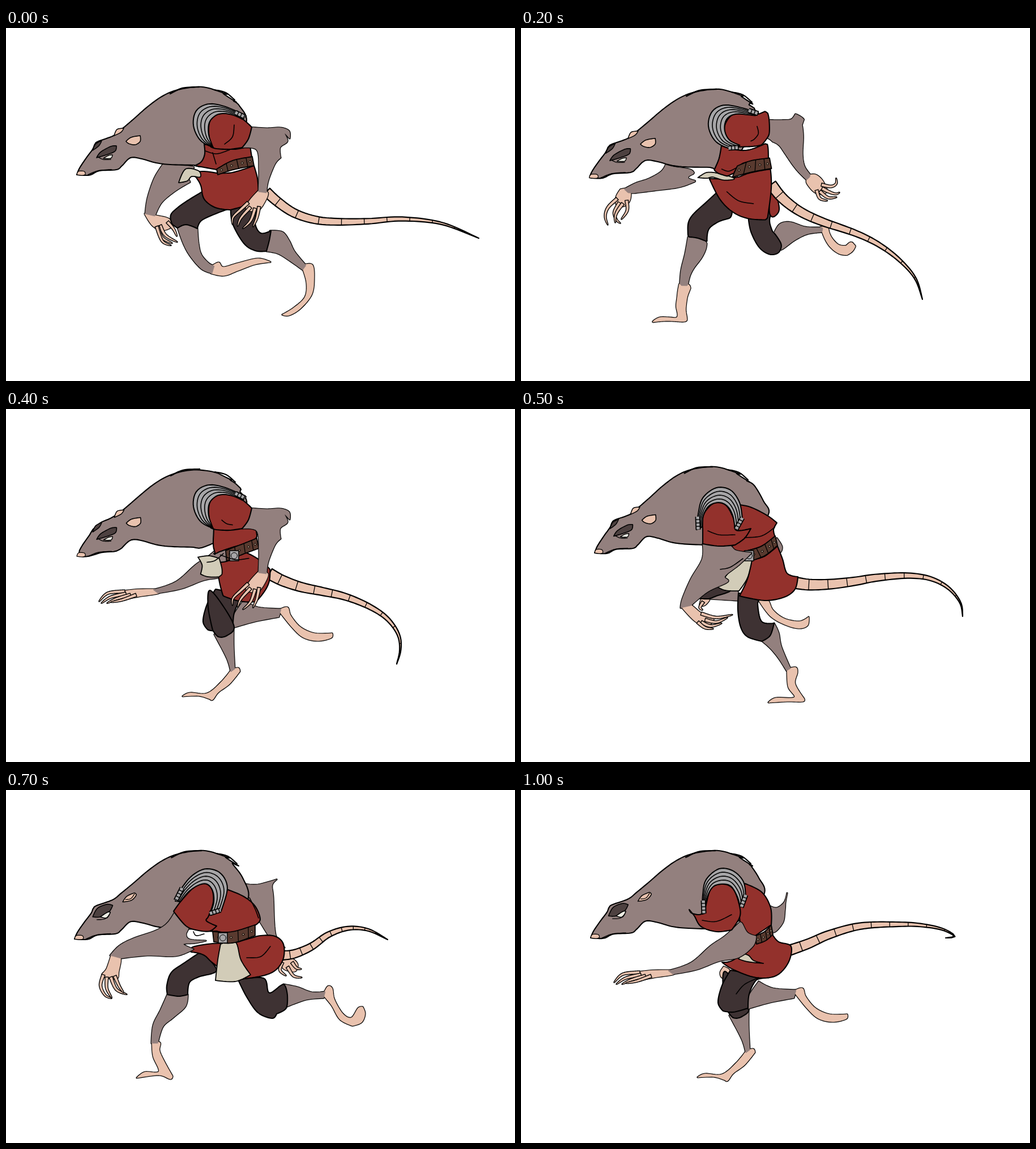
These frames come from a looping animation (899x623 px, 1100 ms). An HTML page with a canvas:

```html
<!DOCTYPE html>
<html lang="en">
<head>
<meta charset="utf-8">
<title>Running rat</title>
<style>
html, body { margin: 0; width: 100%; height: 100%; overflow: hidden; background: #fff; }
canvas { display: block; }
</style>
</head>
<body>
<canvas id="stage" width="899" height="623"></canvas>
<script>
const ctx = document.getElementById('stage').getContext('2d');
const FUR = '#93807e', SKIN = '#e9c2ae', RED = '#93312c', DARK = '#3e3233';
const CREAM = '#d2ccb8', STEEL = '#a6a5a7', LEATHER = '#593a2f', INK = '#000';

// Points are "x,y"; "!" marks a sharp corner, "|" splits a part into pieces.
// head: shift of the nose, shift of the hump, width of the tail.
const poses = {
  reach: {
    head: [0, 0, 0, 0, 17],
    back: '412,137 425,165 405,215 350,243',
    tail: '460,289 480,307 510,327 548,339 588,342 640,341 700,337 770,345 835,371',
    farArm: '277,241! 262,265 250,300 246,328! 263,332! 275,308 300,287 325,272! 320,255 330,245',
    farHand: '245,328! 265,331 288,337 293,350 275,357 258,348|285,342 296,355 302,368|272,348 282,366 303,378|268,350 276,370 294,380|266,350 276,376 292,384',
    nearArm: '428,175! 460,177 485,176 500,182 501,195! 492,186 497,200 484,211 485,229! 475,240 463,270 460,291! 446,289! 447,250 443,215 417,211!',
    nearHand: '445,288! 462,290 458,305 445,322 425,320 430,305|428,308 415,320 401,334 400,347|432,316 415,335 409,350|440,318 432,340 418,354|447,315 443,335 436,351',
    nearThigh: '348,288! 320,305 302,318 291,330 293,345 303,353! 318,347 338,354! 345,340 370,328 397,318! 370,305',
    nearShin: '303,352! 318,347 338,354! 340,380 345,400 358,415 368,420! 364,433! 345,425 325,402 313,380',
    nearFoot: '365,419! 376,414 384,422 410,415 445,407 467,413! 440,417 410,428 385,437 362,433!',
    farThigh: '397,318! 400,345 420,380 440,393 460,394! 465,375 468,358! 450,362 440,345 440,312',
    farShin: '466,358! 488,360 500,375 510,395 530,419! 524,427! 500,410 480,398 460,394!',
    farFoot: '526,418! 541,418 544,440 540,470 520,495 500,507 488,506! 508,494 528,475 531,450 524,425!',
    skirt: '328,255! 350,253 372,256! 400,255 438,243! 444,265 446,290! 430,310 396,321! 370,317 350,302 344,278 336,264',
    cream: '305,273! 317,249 340,252 343,263 328,262 320,270',
    top: '350,205! 400,214 431,208! 436,240! 400,246 372,250! 350,246 333,243! 345,236 351,222',
    belt: '372,249 400,234 435,227|374,259 402,250 438,243',
    sleeve: '362,210! 358,185 360,165 371,153 395,151 418,161 434,175! 428,196 417,211! 395,214 372,213',
    plate: '366,211 343,198 331,172 336,146 358,134 388,139 424,155|365,209 358,188 359,167 371,154 386,151 402,154 418,161',
    strap: '405,149 422,157',
    fold: '403,171 400,192 386,205|352,217 372,222 395,215|365,220 371,240'
  },
  strike: {
    head: [-4, 4, 3, 2, 19],
    back: '405,137 415,152 390,215 350,248',
    tail: '440,278 458,303 488,326 530,344 572,351 648,358 718,378 775,399 818,424',
    farArm: '258,236! 230,262 205,274 189,291! 213,293! 250,285 290,275 317,258! 296,255 312,248 275,243',
    farHand: '191,290! 207,291 212,308 205,318 188,315|188,310 177,328 175,345 186,358|193,316 188,338 205,350 223,347|200,314 194,332 196,340|206,308 212,322 208,338',
    nearArm: '434,161! 462,160 504,155! 492,168 494,180 492,230 491,264! 484,266! 470,238 455,205 440,202!',
    nearHand: '484,264! 498,263 508,285 515,300 500,305 490,295|508,290 525,303 545,299|505,298 520,314 538,324|500,302 510,320 528,327|494,298 491,316 505,323',
    flap: '438,258! 448,290 454,312 441,322',
    nearThigh: '345,284! 310,305 285,325 278,345 277,356! 290,359 307,369! 314,345 340,333 370,318',
    nearShin: '277,356! 290,359 307,369! 303,385 290,400 275,415 266,430 264,448! 252,446! 255,415 268,385',
    nearFoot: '250,444! 258,446 270,448 268,470 275,490 289,513! 285,517 260,517 224,520! 235,512 255,510 268,508 258,485 251,462',
    farThigh: '412,330! 420,355 440,385 460,394 475,388! 480,370 467,348! 450,330 440,300',
    farShin: '467,350! 478,340 495,338 520,347 549,353! 545,361! 520,360 500,370 480,385 473,382',
    farFoot: '543,353! 556,355 562,368 580,388 596,385! 597,370 602,369! 603,390 595,405! 580,404 565,392 552,375',
    skirt: '330,255! 365,258 385,262! 410,254 440,248! 440,275 430,334! 400,332 370,322 350,300',
    cream: '307,273! 318,254 331,249 350,251 385,261 365,265 340,258 327,267',
    top: '350,207! 366,214 400,218 434,202! 437,228! 410,233 390,237! 378,258! 350,250 331,249! 345,230',
    belt: '388,237 415,230 441,227|377,258 410,253 445,245',
    sleeve: '375,212! 362,195 358,172 372,152 395,152 415,158 434,161! 434,192 431,200! 415,213 400,216 385,214',
    plate: '372,214 343,200 330,172 337,146 358,134 388,140 422,152|381,208 364,195 358,178 362,160 376,151 396,152 415,157',
    strap: '402,146 421,153|365,211 380,212',
    fold: '402,170 409,190 399,207 390,212|365,290 385,303 411,302|351,240 365,250 384,248'
  },
  carry: {
    head: [-5, 7, 5, 6, 19],
    back: '400,134 413,150 390,215 352,250',
    tail: '444,274 465,297 494,320 530,340 570,367 605,405 627,445 630,490 600,534',
    farArm: '253,247! 245,262 200,274 174,278! 176,290! 230,288 275,287 306,282! 290,272 300,262 293,252',
    farHand: '160,280! 175,277 177,290 168,305 150,312 148,292|152,292 130,305 122,322 121,338|155,300 138,318 129,343|160,305 142,325 137,348|167,300 163,322 146,338',
    nearArm: '440,164! 465,165 485,163 485,146! 494,160 496,180 498,165! 503,190 502,225 510,248 531,258! 525,270! 500,255 470,225 450,200 434,199!',
    nearHand: '529,256! 550,255 562,262 565,278 550,280 523,268|553,263 575,259 583,245 568,230|558,268 585,268 588,256|555,274 575,278 588,270|550,274 565,285 578,287',
    flap: '442,285! 457,308 456,336 438,338',
    nearThigh: '345,298! 330,320 312,343 308,360 313,382! 335,382 350,385! 350,365 365,348 385,338',
    nearShin: '313,382! 335,382 350,385! 348,410 335,435 324,462! 309,464! 311,430',
    nearFoot: '309,460! 322,458 328,466! 315,485 303,500 298,515 290,519 260,516 239,518! 255,510 285,513 290,495 300,480',
    farThigh: '391,340! 392,365 402,390 420,407 435,408! 440,395 427,375! 430,355 434,343',
    farShin: '428,372! 435,352 455,347 485,355 519,350! 520,360! 490,368 465,380 445,395 433,402',
    farFoot: '515,350! 526,347 530,365 545,380 565,388 578,390! 565,396 545,393 527,380',
    skirt: '335,276! 352,276 375,271! 400,257 441,250! 445,290 440,343! 410,342 385,332 355,310',
    cream: '318,255! 340,260 372,270 350,272 333,266',
    top: '358,208! 395,214 434,203! 438,215 437,232! 400,238 376,250! 368,270! 352,262 354,235',
    belt: '376,250 400,238 437,232|369,269 402,256 440,251',
    sleeve: '388,208! 368,195 361,175 375,154 400,152 420,150 434,134! 442,150 443,180 434,200! 410,203',
    plate: '376,216 346,202 332,176 337,150 358,138 385,140 417,148|392,206 372,200 361,182 364,162 380,153 398,153 413,152',
    strap: '402,145 417,149|368,213 389,210',
    fold: '432,177 429,183 422,187|362,288 385,308 410,318|358,258 368,256 376,246'
  },
  pass: {
    head: [5, -5, -3, -2, 20],
    back: '412,135 428,162 437,186 400,225 335,240',
    tail: '486,307 510,310 548,309 590,304 626,298 680,294 722,299 755,316 776,342 780,366',
    farArm: '452,228! 461,243 457,253 448,240',
    farHand: '319,334! 333,335 325,346 316,346|322,340 316,350 321,355',
    nearArm: '321,238! 320,265 300,300 285,335 282,351! 300,347! 330,322 365,305 360,295 385,275 407,254! 380,250 365,240',
    nearHand: '283,349! 298,345 318,360 340,368 330,382 308,375|318,361 345,368 374,363|325,372 345,376 365,368|318,376 335,383 355,378|312,376 325,386 340,388',
    nearThigh: '384,325! 383,355 388,385 400,402 425,410! 440,400 447,378! 425,375 418,345 420,330',
    nearShin: '425,409! 440,400 447,378! 455,395 460,420 476,458! 469,462! 455,440 440,422',
    nearFoot: '470,459! 485,456 488,465 484,485 499,510! 498,516 470,516 437,518! 450,510 483,509 472,490',
    farThigh: '345,308! 330,315 310,334! 330,335 345,330 370,320',
    farShin: '320,334! 345,322 380,320 384,338! 350,336',
    farFoot: '420,338! 436,338 445,355 465,370 492,375 508,367! 506,382 490,387 465,380 440,365',
    skirt: '408,266! 430,260 453,242! 462,265 470,290 489,296! 484,318 465,332 430,338 386,330! 400,300',
    cream: '360,268! 385,260 408,266! 400,298 385,321! 360,320 344,312! 365,290',
    top: '378,168! 405,173 435,188 452,201! 446,213 449,226! 425,242 400,250! 372,255 363,247! 380,235 380,210',
    belt: '400,250 425,242 449,224|410,267 432,258 453,241',
    buckle: '403,259',
    sleeve: '321,212! 322,188 335,170 349,165 364,172 376,195 380,214 406,211! 395,228 378,240! 350,242 321,238!',
    plate: '310,213 313,185 321,157 345,139 370,143 386,165 391,193|320,208 322,188 332,171 349,165 364,171 374,188 378,212',
    strap: '312,190 313,213|391,192 380,212',
    fold: '330,215 350,222 378,222|395,227 425,224 448,209|352,283 370,279 392,264'
  },
  strikeFar: {
    head: [-4, 4, 4, 3, 16],
    back: '400,130 418,155 428,190 400,230 300,238',
    tail: '488,292 510,289 540,276 570,255 605,244 640,247 674,264',
    farArm: '422,166! 445,167 478,158! 470,168 472,190 476,255 492,278! 475,272 450,235 430,200',
    farHand: '486,298! 505,298 515,308 510,320 490,315|488,304 484,318 495,328|497,312 508,328 523,331|505,304 513,314 522,316',
    nearArm: '298,216! 285,235 265,248 225,262 200,275 184,292! 203,297! 250,292 300,293 331,281! 313,272 335,270 353,266! 325,264 318,255 322,238',
    nearHand: '186,291! 202,296 199,320 195,333 170,328 178,315|172,326 167,345 175,362 187,368|178,330 178,350 187,367|185,330 195,352 214,361|192,328 200,346 208,358',
    farThigh: '345,285! 315,305 292,322 284,345 285,361! 305,364 321,361! 324,340 340,330 372,318',
    farShin: '285,361! 305,364 321,361! 317,382 295,402 277,418 268,447! 257,447! 260,415 273,388',
    farFoot: '258,444! 272,446 271,460 280,480 294,505! 290,510 270,503 231,508! 245,498 270,497 260,470',
    nearThigh: '410,335! 425,365 445,393 470,403 478,395! 495,385 497,362! 490,343 465,358 455,332',
    nearShin: '490,343! 515,348 540,357 564,356! 561,367! 530,370 497,382! 497,362',
    nearFoot: '560,362! 568,347 576,350 580,370 595,395 610,402 622,385 630,383! 634,395 628,410 612,416! 590,405 575,380',
    skirt: '327,286! 330,277 365,271 400,270 430,262 450,257 475,258 490,272 489,300 470,322 430,332 400,330 365,305 352,293 340,288',
    cream: '379,272! 405,268 415,300 432,326! 405,338 370,336! 374,300',
    top: '392,176! 420,188 440,205 449,228 441,238! 400,252 372,249! 352,248 325,235 330,200',
    belt: '365,250 400,250 440,238|367,268 400,270 440,257',
    buckle: '383,261',
    sleeve: '296,214! 310,195 335,169 352,165 364,176 366,198 358,222 354,231 372,240! 360,249 340,248 318,240',
    plate: '299,196 311,172 330,150 354,139 379,147 391,173 380,214|308,197 322,180 340,168 355,166 365,178 367,198 360,221',
    strap: '311,173 300,195|360,218 379,212',
    fold: '425,296 450,294 467,276|430,190 440,210 446,226|331,250 336,257 350,254'
  },
  carryFar: {
    head: [-7, 7, 5, 6, 13],
    back: '400,134 420,162 427,195 400,230 290,240',
    tail: '482,284 510,268 540,252 575,243 610,239 636,243 640,255',
    farArm: '420,164! 445,167 466,162 468,150! 477,165 479,185 481,168! 485,180 483,215 490,237 504,248! 500,262! 475,242 450,212 430,200',
    farHand: '502,246! 520,240 535,240 530,255 515,263 500,260|520,243 535,232 550,224|530,250 550,238 561,240 560,256|525,256 540,260 556,268',
    nearArm: '288,222! 272,242 235,262 200,278 179,292! 187,296! 240,293 285,292 309,290! 300,286 322,282 307,278 310,250 318,249',
    nearHand: '165,292! 187,292 172,312 158,322 140,315|150,308 128,318 117,344|150,315 138,328 134,342|155,318 145,340 153,366|162,315 155,335 155,355',
    farThigh: '338,302! 320,322 304,345 308,388! 325,390 345,382! 345,362 360,345 385,335',
    farShin: '308,388! 325,390 345,382! 343,405 328,430 319,457! 307,458! 306,420',
    farFoot: '307,454! 322,453 328,458! 310,480 298,500 292,510 285,508 260,502 236,508! 250,499 283,503 290,480',
    nearThigh: '399,335! 403,370 418,403 440,418 448,415! 462,390 457,365! 445,360 448,338',
    nearShin: '445,358! 458,350 490,358 531,360! 529,370! 495,375 470,390 458,398 457,365',
    nearFoot: '528,360! 535,347 542,350 545,370 565,388 585,390 583,370 588,366! 597,382 595,400 585,407 565,402 540,385',
    skirt: '332,300! 345,285 375,281 402,283 440,266 465,268 484,275 485,305 470,325 430,337 385,332 350,312 335,308',
    cream: '375,284! 403,283 425,305 458,324! 430,333 390,331 377,308',
    top: '388,171! 420,190 437,218 440,243! 405,262 370,264! 345,260 335,252 318,250 340,200',
    belt: '369,262 400,264 437,244|372,279 402,284 441,262',
    buckle: '389,274',
    sleeve: '278,180! 300,186 325,172 345,165 360,175 364,200 355,220 342,228 318,249! 300,238 285,220',
    plate: '303,184 313,167 330,149 352,141 376,149 389,175 376,213|312,186 322,174 340,166 355,167 364,180 364,200 356,223',
    strap: '310,172 302,184|357,220 376,213',
    fold: '297,219 308,222 317,216|437,300 452,298 464,282|404,200 420,215 426,235'
  },
  passFar: {
    head: [-2, 2, 2, 3, 18],
    back: '405,132 420,155 430,182 400,225 330,242',
    tail: '474,283 508,271 545,255 600,240 670,237 710,239 745,246 766,258 750,261',
    farArm: '440,205! 452,208 465,198 470,182! 467,198 466,212 462,235 444,250',
    farHand: '358,312! 368,318 364,330 355,331 352,322',
    nearArm: '385,235! 360,258 335,275 300,305 260,319! 268,325! 310,317 350,302 385,295 410,275 415,258! 400,252 390,235',
    nearHand: '262,318! 270,325 240,330 205,335 195,325 225,319|210,322 180,325 164,340|212,326 185,332 168,343|220,328 195,335 178,343|230,328 205,337 185,341',
    farThigh: '365,390! 375,402 390,400 403,385 385,350 360,320 357,350',
    farShin: '368,398! 385,402 402,390! 402,420 404,459! 397,464! 390,440',
    farFoot: '398,460! 410,457 413,463! 395,485 375,500 365,513 358,511 340,506 312,507! 325,501 355,502 380,482',
    nearThigh: '370,318! 355,345 348,375 357,390! 375,392 401,385! 403,360 415,336 430,330',
    nearShin: '420,338! 445,350 486,353! 482,367! 440,375 401,386! 402,365',
    nearFoot: '481,355! 497,350 503,365 520,385 545,396 576,396! 574,404 550,409 525,403 505,385',
    skirt: '355,304! 375,300 410,272 444,255! 455,268 477,276 472,305 450,328 415,331 375,317',
    cream: '384,298! 392,290 402,292 411,301 428,306! 400,303',
    top: '395,165! 425,180 441,208 442,238! 414,257! 395,255 388,240 386,205',
    belt: '413,258 430,250 442,238|416,272 432,266 445,255',
    sleeve: '297,211! 303,218 322,216 335,175 356,166 375,175 386,205 386,225 372,247! 345,250 318,241 306,222',
    plate: '320,219 321,185 327,158 350,139 375,143 393,162 397,188|326,217 328,192 339,171 356,166 371,170 382,188 387,206',
    strap: '322,195 323,218|397,185 389,207',
    fold: '320,230 345,232 372,220|380,360 395,343 420,331'
  }
};

const chest = '330,242 290,241 265,238 240,231 220,229 205,243 195,250 165,252 150,259 138,260 125,259! 130,247 142,229 153,214 157,205 163,200 190,190 205,178 225,161 250,139 275,121 300,110 335,104 358,106 390,117! 384,116 407,131! 402,129';
const openParts = ['tail', 'plate', 'strap', 'belt', 'fold', 'buckle'];

const mix = (a, b, k) => a + (b - a) * k;
const mixPt = (p, q, k) => [mix(p[0], q[0], k), mix(p[1], q[1], k)];
const read = s => s.split(' ').map(w => [...w.replace('!', '').split(',').map(Number), w.endsWith('!')]);

// Smooth curve through points, as a polyline
function curve(pts, closed) {
  const n = pts.length, out = [];
  if (n < 2) return pts;
  const at = i => closed ? pts[(i + n) % n] : pts[Math.max(0, Math.min(n - 1, i))];
  const slope = (i, c) => at(i)[2] ? 0 : (at(i + 1)[c] - at(i - 1)[c]) / 6;
  for (let i = 0; i < (closed ? n : n - 1); i++) {
    for (let s = 0; s < 8; s++) {
      const t = s / 8, u = 1 - t;
      out.push([0, 1].map(c => {
        const a = at(i)[c], b = at(i + 1)[c];
        return u * u * u * a + 3 * u * u * t * (a + slope(i, c)) + 3 * u * t * t * (b - slope(i + 1, c)) + t * t * t * b;
      }));
    }
  }
  out.push(at(closed ? 0 : n - 1));
  return out;
}

function resample(line, n) {
  const len = [0];
  for (let i = 1; i < line.length; i++)
    len.push(len[i - 1] + Math.hypot(line[i][0] - line[i - 1][0], line[i][1] - line[i - 1][1]));
  const out = [];
  for (let k = 0, i = 1; k < n; k++) {
    const d = len[len.length - 1] * k / (n - 1);
    while (i < line.length - 1 && len[i] < d) i++;
    out.push(line.length < 2 ? line[0] : mixPt(line[i - 1], line[i], (d - len[i - 1]) / (len[i] - len[i - 1] || 1)));
  }
  return out;
}

function shift([x, y, c], h) {
  const k = Math.max(0, Math.min(1, (x - 125) / 210));
  return [x + mix(h[0], h[2], k), y + mix(h[1], h[3], k), c];
}

function build(src, turned) {
  const pose = { head: src.head, turned };
  for (const key in src) {
    if (key === 'head' || key === 'back') continue;
    pose[key] = src[key].split('|').map((s, i) =>
      curve(read(s), !openParts.includes(key) && !(key.endsWith('Hand') && i)));
  }
  pose.body = [curve([...read(chest).map(p => shift(p, src.head)), ...read(src.back)], true)];
  return pose;
}

function between(a, b) {
  const pose = { head: a.head.map((v, i) => mix(v, b.head[i], .5)), turned: b.turned };
  for (const key of new Set([...Object.keys(a), ...Object.keys(b)])) {
    if (key in pose) continue;
    if (!a[key] || !b[key]) { pose[key] = a[key] || b[key]; continue; }
    pose[key] = a[key].slice(0, b[key].length).map((line, i) => {
      const q = resample(b[key][i], 140);
      return resample(line, 140).map((p, j) => mixPt(p, q[j], .5));
    });
  }
  return pose;
}

// Limbs of one side take the shape of the other side half a cycle later
function borrow(pose, from, side, names) {
  const other = side === 'near' ? 'far' : 'near';
  for (const n of names) pose[side + n] = from[other + n];
}

const leg = ['Thigh', 'Shin', 'Foot'], arm = ['Arm', 'Hand'];
const P = {};
Object.keys(poses).forEach((k, i) => P[k] = build(poses[k], i > 3));
const late = between(P.carry, P.pass), lift = between(P.pass, P.strikeFar);
borrow(late, P.passFar, 'near', leg);
borrow(late, P.passFar, 'far', [...leg, ...arm]);
for (const k of ['sleeve', 'plate', 'strap', 'nearArm', 'nearHand']) late[k] = P.reach[k];
delete late.flap;
borrow(lift, P.reach, 'near', leg);
borrow(lift, P.reach, 'far', [...leg, ...arm]);
const cycle = [P.reach, P.strike, between(P.strike, P.carry), P.carry, late, P.pass, lift,
  P.strikeFar, between(P.strikeFar, P.carryFar), P.carryFar, P.passFar];

function trace(line) {
  ctx.beginPath();
  line.forEach(p => ctx.lineTo(p[0], p[1]));
}
function stroke(line, w = 1.8, color = INK) {
  trace(line);
  ctx.lineWidth = w;
  ctx.strokeStyle = color;
  ctx.stroke();
}
function shape(line, color, w = 2.1) {
  if (!line) return;
  trace(line);
  ctx.closePath();
  ctx.fillStyle = color;
  ctx.fill();
  ctx.lineWidth = w;
  ctx.strokeStyle = INK;
  if (w) ctx.stroke();
}
// Outline several shapes as one
function merged(list) {
  list = list.filter(([l]) => l);
  list.forEach(([l]) => stroke(l, 3.2));
  list.forEach(([l, c]) => { shape(l, c, 0); stroke(l, .8, c); });
}

function taper(line, w, rings) {
  const n = 60, mid = resample(line, n), left = [], right = [], cuts = [];
  mid.forEach((p, i) => {
    const a = mid[Math.max(0, i - 1)], b = mid[Math.min(n - 1, i + 1)];
    const d = Math.hypot(b[0] - a[0], b[1] - a[1]) || 1;
    const r = w / 2 * Math.pow(1 - i / (n - 1), rings ? .85 : .35);
    const nx = (b[1] - a[1]) / d * r, ny = (a[0] - b[0]) / d * r;
    left.push([p[0] + nx, p[1] + ny]);
    right.push([p[0] - nx, p[1] - ny]);
    if (rings && i % 6 === 4) cuts.push(i);
  });
  shape([...left, ...right.reverse()], SKIN, rings ? 2.2 : 1.4);
  right.reverse();
  cuts.forEach(i => stroke([left[i], right[i]], 1.3));
}

function limb(a, hand) {
  merged([[hand && hand[0], SKIN], [a && a[0], FUR]]);
  if (hand) hand.slice(1).forEach(f => taper(f, 6));
}
function legParts(pose, side) {
  merged([[pose[side + 'Foot'][0], SKIN], [pose[side + 'Shin'][0], FUR]]);
  shape(pose[side + 'Thigh'][0], DARK);
}

function belt([up, low], buckle) {
  const a = resample(up, 25), b = resample(low, 25);
  shape([...a, ...b.slice().reverse()], LEATHER, 1.8);
  [7, 14, 20].forEach(i => stroke([a[i], b[i]], 1.3));
  [3, 10, 17, 22].forEach(i => {
    const [x, y] = mixPt(a[i], b[i], .5);
    dot(x, y, 1.8, '#b59a83', 1);
  });
  if (!buckle) return;
  const [x, y] = buckle[0][0];
  ctx.fillStyle = STEEL;
  ctx.lineWidth = 1.5;
  ctx.strokeStyle = INK;
  ctx.fillRect(x - 8, y - 9, 16, 18);
  ctx.strokeRect(x - 8, y - 9, 16, 18);
  dot(x, y, 5.5, STEEL, 1);
}
function dot(x, y, r, color, w) {
  ctx.beginPath();
  ctx.arc(x, y, r, 0, 7);
  ctx.fillStyle = color;
  ctx.fill();
  ctx.lineWidth = w;
  ctx.strokeStyle = INK;
  ctx.stroke();
}

function plate([outer, inner], straps) {
  const a = resample(outer, 40), b = resample(inner, 40);
  shape([...a, ...b.slice().reverse()], STEEL, 2);
  [.25, .5, .75].forEach(k => stroke(a.map((p, i) => mixPt(p, b[i], k)), 1.6));
  ctx.lineCap = 'butt';
  straps.forEach(s => {
    stroke(s, 9);
    ctx.setLineDash([4.5, 1.5]);
    stroke(s, 5.5, STEEL);
    ctx.setLineDash([]);
  });
  ctx.lineCap = 'round';
}

function face(pose) {
  const bit = (s, color, w) => shape(curve(read(s).map(p => shift(p, pose.head)), true), color, w);
  const hair = (s, w) => stroke(curve(read(s).map(p => shift(p, pose.head))), w);
  bit('125,259! 128,253 138,253 140,258 135,260', SKIN, 1.2);
  hair('290,116 312,106 341,104', 2.4);
  hair('368,109 388,114 404,127', 2.2);
  hair('145,259 163,252 186,250', 1.8);
  if (pose.turned) {
    bit('207,194! 214,184 227,178! 230,182 222,191', SKIN, 1.5);
    hair('212,190 221,188 227,180', 1.3);
    bit('156,220! 164,205 180,198 190,200! 184,211 169,220', '#4d4140', 1.6);
    bit('169,220! 181,212 186,212! 180,222', '#eeeee4', 1.6);
    hair('163,225 176,224 184,217', 1.3);
  } else {
    bit('191,190! 196,179 208,177! 203,184', SKIN, 1.5);
    bit('212,200! 221,193 237,190! 237,200 228,206 217,204', SKIN, 1.6);
    bit('153,216! 158,205 169,199! 164,208', '#4d4140', 1.5);
    bit('160,229! 167,219 185,209 195,208! 193,217 180,223', '#4d4140', 1.6);
    bit('172,230! 181,225 188,224! 185,230', '#eeeee4', 1.4);
    hair('163,228 172,232 185,232', 1.4);
  }
}

function draw(pose) {
  ctx.fillStyle = '#fff';
  ctx.fillRect(0, 0, 899, 623);
  ctx.lineJoin = ctx.lineCap = 'round';
  limb(pose.farArm, pose.farHand);
  legParts(pose, 'far');
  if (pose.flap) shape(pose.flap[0], RED);
  taper(pose.tail[0], pose.head[4], true);
  legParts(pose, 'near');
  shape(pose.body[0], FUR);
  face(pose);
  shape(pose.skirt[0], RED);
  shape(pose.cream[0], CREAM, 1.8);
  shape(pose.top[0], RED);
  belt(pose.belt, pose.buckle);
  limb(pose.nearArm, pose.nearHand);
  shape(pose.sleeve[0], RED);
  plate(pose.plate, pose.strap);
  pose.fold.forEach(l => stroke(l, 1.6));
}

function tick(now) {
  draw(cycle[Math.floor(now % 1100 / 100)]);
  requestAnimationFrame(tick);
}
draw(cycle[0]);
requestAnimationFrame(tick);
</script>
</body>
</html>
```
